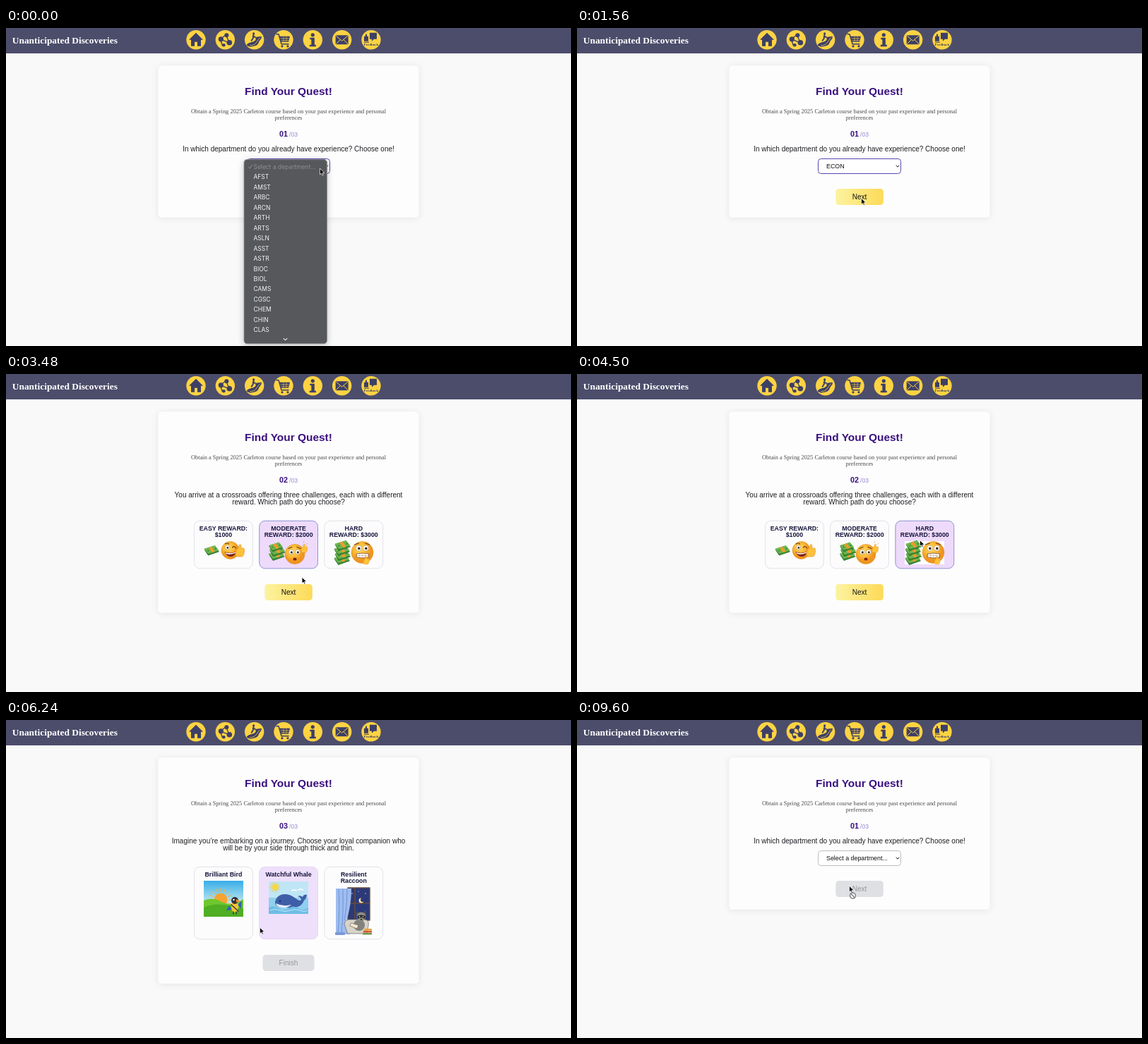
Animation of 800x451 px, one loop 9660 ms. Source, as an HTML page:

```html
<!DOCTYPE html>
<html lang="en">
<head>
<meta charset="utf-8">
<title>Find Your Quest!</title>
<style>
html, body { margin: 0; width: 100%; height: 100%; overflow: hidden; background: #f9f9f9; }
svg { display: block; width: 100%; height: 100%; }
text { font-family: "Liberation Sans", Arial, sans-serif; white-space: pre; }
.serif { font-family: "Liberation Serif", Times, serif; }
.menu { font-family: Inter, sans-serif; }
.b { font-weight: bold; }
</style>
</head>
<body>
<svg id="stage" viewBox="0 0 800 451" xmlns="http://www.w3.org/2000/svg"></svg>
<script>
const LOOP = 9660, ROW = 14.45;
const INK = "#3d3f66", GOLD = "#fdd343", NAVY = "#17173d";
const CODES = "AFST AMST ARBC ARCN ARTH ARTS ASLN ASST ASTR BIOC BIOL CAMS CGSC CHEM CHIN CLAS CS DANC ECON EDUC ENGL FREN".split(" ");
const COLS = [266.5, 358.7, 450.9];

// cursor tip over time: ms, x, y
const PATH = [
  [0, 444.5, 199.5], [250, 444.5, 199.5], [850, 424.5, 375.5], [1200, 424.5, 375.5],
  [1600, 402, 238], [1900, 402, 238], [2350, 419, 243], [2850, 419, 243],
  [3150, 402, 302], [3350, 402, 302], [3800, 485.5, 236], [4550, 485.5, 236],
  [4950, 402, 309], [5500, 402, 309], [6100, 359.5, 294.5], [6280, 359.5, 294.5],
  [6600, 402, 262], [6850, 402, 262], [7250, 393.5, 349.5], [8300, 393.5, 349.5],
  [8950, 345, 229], [9380, 345, 229], [9570, 385.5, 235.5], [LOOP, 385.5, 235.5]
];
const AT = { close: 1200, page2: 1850, pick2: 2800, pick3: 3950, page3: 5350, whale: 6750, result: 7500, again: 9400 };

const text = (x, y, size, fill, str, cls = "", anchor = "middle", more = "") =>
  `<text x="${x}" y="${y}" font-size="${size}" fill="${fill}" class="${cls}" text-anchor="${anchor}" ${more}>${str}</text>`;
const rect = (x, y, w, h, r, fill, more = "") =>
  `<rect x="${x}" y="${y}" width="${w}" height="${h}" rx="${r}" fill="${fill}" ${more}/>`;
const circ = (x, y, r, fill, more = "") => `<circle cx="${x}" cy="${y}" r="${r}" fill="${fill}" ${more}/>`;
const path = (d, fill = "none", stroke = "none", w = 1) =>
  `<path d="${d}" fill="${fill}" stroke="${stroke}" stroke-width="${w}" stroke-linecap="round" stroke-linejoin="round"/>`;
const group = (id, body, more = "") => `<g id="${id}" ${more}>${body}</g>`;
const at = (x, y, body, more = "") => `<g transform="translate(${x} ${y}) ${more}">${body}</g>`;

function icons() {
  const glyphs = [
    path("M-10 0L0-10 10 0H7V9H2V3H-2V9H-7V0Z", INK),
    path("M-7-1L1-7M-7-1L6 4M6 4L1-7M-7-1L-4 8", "none", INK, 1.4) +
      circ(-6, -1, 3.6, INK) + circ(2, -6.5, 3, INK) + circ(6, 4, 3.8, INK) + circ(-2, 7.5, 2.3, INK),
    path("M-11 8C-10 3-2 4 1 1S-1-3 3-4L10-5C11-1 7 0 6 4S0 9-6 10Z", INK) +
      path("M-1-8L-2-2M-2-5L1-4M-2-2L-4 1", "none", INK, 2) + circ(-1, -9, 1.6, INK) +
      path("M-6 8C0 8 2 5 4 2S7-2 8-3", "none", GOLD, .8),
    path("M-6-5H9L7 3H-4Z", INK) + path("M-10-8H-7L-3 6H7", "none", INK, 1.5) +
      circ(-2, 9, 1.6, INK) + circ(6, 9, 1.6, INK) + path("M-4-2H7M-3 1H7M0-4V2M4-4V2", "none", GOLD, .6),
    circ(0, -7, 2.6, INK) + path("M-4-3H2.5V7H4.5V9.5H-4.5V7H-2V-.5H-4Z", INK),
    rect(-9, -6.5, 18, 13, 1, INK) + path("M-8-5.5L0 1.5 8-5.5M-8 5.5L-2.5 0M8 5.5L2.5 0", "none", GOLD, 1),
    path("M-2-10H8V-1H4L1 2V-1H-2Z", INK) + path("M-10-5H-4V2H-10ZM-8-8H-6V-5H-8ZM-10 3H-3V4H-10Z", INK) +
      text(0, 8.3, 5, INK, "Feedback", "serif b")
  ];
  return glyphs.map((g, i) => at(269 + i * 41.33, 16.8, circ(0, 0, 13.7, GOLD) + g)).join("");
}

function bill(x, y, s = 1) {
  return at(x, y,
    path("M-11-2L5-7 11 2-5 8Z", "#3f8f38") + path("M-11-2L5-7 11 0-5 5Z", "#70b64d") +
    path("M-4-4L0-5.3 5 2 1 3.5Z", "#f19a2c") + path("M-10 0L-5 7 11 2", "none", "#2d6f2c", .8) +
    circ(-5, .5, 1.3, "#3f8f38") + circ(6, -2.3, 1.3, "#3f8f38"), `scale(${s})`);
}
const ball = r => circ(0, 0, r, "url(#face)", 'stroke="#d98a1c" stroke-width=".5"');
const eye = (x, y, r) => circ(x, y, r, "#fff", 'stroke="#8a5a20" stroke-width=".4"') + circ(x + .3, y + .4, r * .45, "#3d2c1c");
const thumb = path("M-4 1C-3-1 0-3 1-8C3-9 4-7 3-3H7C9-2 8 7 5 9H-2C-5 8-5 4-4 1Z", "#ffc13a", "#d98a1c", .6);

const easy = bill(291, 250, .95) +
  at(317.5, 250, ball(12.5) + eye(-4, -4, 3.2) + path("M3-4Q6-7 8-3M-7-9Q-4-11-2-9", "none", "#6b3d14", 1.2) +
    path("M-8 2Q1 6 9 1Q6 10 0 9Q-6 8-8 2Z", "#7b2417") + path("M-7 3Q1 6 8 2L7 4Q0 7-6 5Z", "#fff")) +
  at(329.5, 250, thumb);
const moderate = bill(383, 257) + bill(384, 251) + bill(382, 245, .9) +
  at(409, 255.5, ball(14) + eye(-5, -3, 3.5) + eye(4, -3, 3.5) + path("M-9-8L-4-10M3-10L8-8", "none", "#6b3d14", 1.3) +
    `<ellipse cx="0" cy="7" rx="2.6" ry="2" fill="#7b2417"/>`) +
  at(421, 247, thumb, "scale(.7)") + path("M421 239l1-2M425 242l2-2", "none", "#d9a24a", .7);
const hard = rect(464, 237, 56, 33, 0, "#fff") +
  [263, 257, 250, 243].map((y, i) => bill(475.5 + (i % 2), y, 1)).join("") +
  at(504.5, 253, ball(15.5) + eye(-5, -6, 4) + eye(5, -6, 4) + path("M-11-11L-5-13M4-13L10-11", "none", "#6b3d14", 1.2) +
    path("M-8 2Q0 0 9 2V7Q0 9-8 7Z", "#fff", "#7b4a20", .8) + path("M-4 1V8M0 1V8M4 1V8M-8 4.5H9", "none", "#a98258", .4)) +
  at(509, 264, thumb, "scale(.65)");

const rays = (x, y, r, n, c) => Array.from({ length: n }, (_, i) => {
  const a = i * 2 * Math.PI / n, p = k => `${(x + k * Math.cos(a)).toFixed(1)} ${(y + k * Math.sin(a)).toFixed(1)}`;
  return path(`M${p(r * 1.25)}L${p(r * 1.8)}`, "none", c, 1);
}).join("");

const bird = rect(280, 228, 56, 51, 0, "url(#sky)") + rays(304, 255, 9, 16, "#f6b23c") + circ(304, 255, 9.5, "#f7a32f") +
  path("M280 256Q292 250 306 258T336 254V279H280Z", "#6fc72e") + path("M280 266Q300 256 336 268V279H280Z", "#4fae23") +
  path("M316 263L312 270 320 269ZM328 262L334 256 333 268Z", "#2f5fc0") +
  `<ellipse cx="324" cy="265" rx="5" ry="8" fill="#f4c62a"/>` + circ(324, 256, 5, "#30343c") + circ(322.5, 255, 1.2, "#fff") +
  path("M326 254L332 257 326 259Z", "#f08a24") + path("M319 262L329 271M322 272V275M326 272V275", "none", "#3c3150", 1.4);
const whale = rect(372, 229, 56, 46, 0, "#bfe6f6") + rect(372, 252, 56, 23, 0, "#8fd0ee") +
  rays(381, 237, 4, 12, "#f3c936") + circ(381, 237, 4.5, "#f9d643") +
  path("M381 259C382 248 393 245 401 248C410 251 413 257 417 256C419 255 418 252 413 250C416 248 419 250 420 251C421 248 423 247 426 248C426 253 422 255 421 258C417 266 408 267 398 266C387 266 381 264 381 259Z", "#3f5ea8") +
  path("M382 260Q392 265 404 262Q399 267 391 266Q383 265 382 260Z", "#e6eef8") + circ(388, 257, 1, "#10182c") +
  path("M372 266Q379 262 386 267T400 267T414 267T428 266V275H372Z", "#6fbde6") +
  path("M374 270Q381 267 388 270T402 270T416 270T427 270", "none", "#d9f2fc", .8) +
  path("M405 242q3-2 6 0M414 241q3-2 6 0", "none", "#fff", 1.6);
const raccoon = rect(465, 237, 55, 69, 0, "#fff") + rect(484, 238, 31, 46, 0, "#2b3a78") +
  path("M484 238H515V284H484ZM494 238V284M484 260H515", "none", "#6b4b3c", 1.5) +
  circ(503, 256, 3.5, "#f6e6a0") + circ(505, 255, 3, "#2b3a78") + circ(490, 246, .7, "#fff") + circ(509, 246, .7, "#fff") + circ(499, 243, .6, "#fff") +
  path("M467 239H489Q489 264 482 284L487 304H467Z", "#9fbdf0") +
  path("M471 240Q473 270 470 303M477 240Q478 270 475 303M483 240Q483 265 479 284", "none", "#6e93d8", 1) +
  path("M479 289Q480 282 488 283H508Q515 284 513 292L511 303H484Z", "#d7d3cb", "#6b6660", .7) +
  `<ellipse cx="500" cy="291" rx="8" ry="8" fill="#84827f"/>` + path("M495 276L497 271 501 274H505L509 270 510 277Z", "#55524f") +
  circ(503, 279, 6.5, "#8f8d89") + path("M497 278Q503 275 509 278L508 282 503 280 498 282Z", "#2d2b2b") +
  circ(500.5, 279, .8, "#fff") + circ(505.5, 279, .8, "#fff") + circ(503, 283, 1.1, "#222") +
  path("M489 288L499 291 497 296 487 292Z", "#f2e7cf", "#6b5a48", .6) +
  rect(506, 299, 12, 2.5, 0, "#d2542e") + rect(507, 296, 11, 2.5, 0, "#e2a33a") + rect(505, 302, 13, 2.5, 0, "#6f9a4c") +
  rect(466, 301, 14, 4, 1, "#7d98d2");

const button = (id, x, y, w, label, on) => group(id,
  rect(x, y, w, 23, 4.5, on ? "url(#gold)" : "#dfe0e3") +
  text(x + w / 2, y + 15.1, 10.1, on ? "#151515" : "#97979c", label));
const both = (id, x, y, w, label) => button(id + "Off", x, y, w, label, false) + button(id + "On", x, y, w, label, true);

const option = (page, i, h, lines, pic) =>
  rect(COLS[i], 208.3, 82.8, h, 8, "#fcfcfd", `id="opt${page}${i}" stroke="#e2e2ea" stroke-width="1"`) +
  lines.map((s, k) => text(COLS[i] + 41.4, 222 + k * 9.1, 8.8, NAVY, s, "b")).join("") + pic;

const step = n => text(387, 153.6, 10.8, "#3a117f", "0" + n, "b", "start") + text(401, 153.6, 8.6, "#9787d3", "/03", "", "start");
const ask = (...lines) => lines.map((s, i) => text(400, 174.8 + i * 10.3, 10, "#1f1f24", s)).join("");
const intro = size => text(400, 121, size, "#4b4b50", "Obtain a Spring 2025 Carleton course based on your past experience and personal", "serif") +
  text(400, 130, size, "#4b4b50", "preferences", "serif");

const page1 = intro(8.43) + step(1) + ask("In which department do you already have experience? Choose one!") +
  rect(341.5, 185.5, 117, 21, 4, "#fff", 'id="select" stroke-width="1"') +
  text(353, 199.2, 8.9, "#111", "", "", "start", 'id="choice"') + path("M452 195l2 2.2 2-2.2", "none", "#222", 1) +
  both("next1", 366.3, 228, 67.5, "Next");
const page2 = intro(8.43) + step(2) +
  ask("You arrive at a crossroads offering three challenges, each with a different", "reward. Which path do you choose?") +
  option(2, 0, 67.5, ["EASY REWARD:", "$1000"], easy) +
  option(2, 1, 67.5, ["MODERATE", "REWARD: $2000"], moderate) +
  option(2, 2, 67.5, ["HARD", "REWARD: $3000"], hard) + both("next2", 366.3, 298, 67.5, "Next");
const page3 = intro(8.43) + step(3) +
  ask("Imagine you’re embarking on a journey. Choose your loyal companion who", "will be by your side through thick and thin.") +
  option(3, 0, 102.5, ["Brilliant Bird"], bird) + option(3, 1, 102.5, ["Watchful Whale"], whale) +
  option(3, 2, 102.5, ["Resilient", "Raccoon"], raccoon) + both("finish", 363.5, 333, 73, "Finish");
const page4 = intro(8.91) + text(400.4, 159.5, 13.3, "#26262e", "Result", "serif b", "middle", 'letter-spacing=".8"') +
  rect(250, 164, 300, 1.6, 0, "#4a9ad4") +
  text(348.3, 192, 8.9, "#3f3f45", "Your course:", "serif", "start") + text(395.8, 192.2, 11.8, "#5a94de", "MATH 331", "serif", "start") +
  button("redo", 282.3, 219.3, 120.5, "Do Another Quiz", true) + button("graph", 411.5, 219.3, 106.3, "See In Graph", true) +
  circ(402.8, 265, 5.6, GOLD) + path("M400 265H405.6M402.8 262.2V267.8", "none", "#fff", 1.4);

const menu = rect(337, 0, 117.5, 0, 4.5, "#57585b", 'id="panel" stroke="#8d8d90" stroke-width=".8" filter="url(#drop)"') +
  rect(340, 0, 111.6, ROW, 3, "#4a82e8", 'id="mark"') +
  `<g clip-path="url(#list)"><g id="rows">` +
  path("M343.5 0l1.8 2.2 3-5", "none", "#8f8f92", 1) + text(350.5, 3, 8.45, "#8f8f92", "Select a department...", "menu", "start") +
  CODES.map((c, i) => text(350.5, 3 + (i + 1) * ROW, 8.45, "#f4f4f5", c, "menu", "start")).join("") + "</g></g>" +
  path("M393 440.3l2.5 2.4 2.5-2.4", "none", "#eee", 1.1);

const cursor = group("arrow", path("M0 0V8.4L2 6.6 3.4 9.6 4.8 9 3.5 6.1H6.2Z", "#000", "#fff", .7)) +
  group("hand", path("M-1 0C-1-1.5 1-1.5 1 0V3.5L4 4.3Q5 4.7 4.8 6L4 9.5H-1.5L-4 6C-4 4.7-2.5 4.6-1 6Z", "#fff", "#222", .7)) +
  group("ban", circ(5, 13.6, 4, "#f4f4f4", 'stroke="#77777a" stroke-width="1.3"') + path("M2.4 11L7.6 16.2", "none", "#77777a", 1.2));

const stop = (o, c) => `<stop offset="${o}" stop-color="${c}"/>`;
document.getElementById("stage").innerHTML = `<defs>
  <linearGradient id="gold">${stop(0, "#fcf3a0")}${stop(1, "#fdda58")}</linearGradient>
  <linearGradient id="sky" x2="0" y2="1">${stop(0, "#36aee8")}${stop(.6, "#bfe5ee")}</linearGradient>
  <radialGradient id="face" cx=".4" cy=".35">${stop(0, "#ffdf6a")}${stop(.6, "#fcb934")}${stop(1, "#ef9420")}</radialGradient>
  <filter id="soft" x="-10%" y="-15%" width="120%" height="130%"><feDropShadow dx="0" dy="1" stdDeviation="5" flood-opacity=".09"/></filter>
  <filter id="drop" x="-20%" y="-10%" width="140%" height="120%"><feDropShadow dx="0" dy="2" stdDeviation="4" flood-opacity=".25"/></filter>
  <clipPath id="list"><rect x="337" y="90" width="118" height="345"/></clipPath></defs>` +
  rect(0, 0, 800, 451, 0, "#f9f9f9") + rect(0, 0, 800, 36, 0, "#4c4d6b") +
  text(8.8, 22.2, 13.4, "#fff", "Unanticipated Discoveries", "serif b", "start") + icons() +
  rect(215.7, 53.7, 368.6, 215, 4.5, "#fdfdfd", 'id="card" filter="url(#soft)"') +
  text(400, 95, 15.45, "#3a117f", "Find Your Quest!", "b") +
  [page1, page2, page3, page4].map((p, i) => group("page" + (i + 1), p)).join("") +
  group("menu", menu) + group("cursor", cursor);

const $ = {};
document.querySelectorAll("#stage [id]").forEach(e => $[e.id] = e);
const show = (id, on) => $[id].style.display = on ? "" : "none";
const set = (id, attrs) => { for (const k in attrs) $[id].setAttribute(k, attrs[k]); };
const ease = p => { p = Math.min(1, Math.max(0, p)); return p * p * (3 - 2 * p); };

function pointer(t) {
  const i = Math.max(1, PATH.findIndex(k => k[0] > t));
  const [t0, x0, y0] = PATH[i - 1], [t1, x1, y1] = PATH[i], p = ease((t - t0) / (t1 - t0));
  return [x0 + (x1 - x0) * p, y0 + (y1 - y0) * p];
}

function options(page, h, picked, x, y) {
  COLS.forEach((c, i) => {
    const over = x >= c && x <= c + 83 && y >= 208 && y <= 208 + h, on = i === picked;
    set("opt" + page + i, { fill: on ? "#eedafb" : over ? "#eedffb" : "#fcfcfd", stroke: on ? "#8d93d2" : over ? "#e6d8f2" : "#e2e2ea" });
  });
}

function draw(t) {
  const [x, y] = pointer(t);
  const page = t < AT.page2 || t >= AT.again ? 1 : t < AT.page3 ? 2 : t < AT.result ? 3 : 4;
  for (let i = 1; i <= 4; i++) show("page" + i, i === page);
  set("card", { height: [215, 284.8, 320, 235][page - 1] });

  const open = t < AT.close, chosen = !open && t < AT.page2;
  $.choice.textContent = chosen ? "ECON" : "Select a department...";
  set("select", { stroke: t < AT.page2 ? "#5a46ae" : "#bdbdc2" });
  const enable = (id, on) => { show(id + "On", on); show(id + "Off", !on); };
  enable("next1", chosen);
  enable("next2", t >= AT.pick2);
  enable("finish", t >= AT.whale);
  options(2, 68, t < AT.pick2 ? -1 : t < AT.pick3 ? 1 : 2, x, y);
  options(3, 103, t < AT.whale ? -1 : 1, x, y);

  show("menu", open);
  if (open) {
    const base = 197 - 86.7 * ease((t - 400) / 450), row = Math.round((y + 4 - base) / ROW);
    set("panel", { y: base - 10.5, height: 458.2 - base });
    set("rows", { transform: `translate(0 ${base})` });
    show("mark", row > 0);
    set("mark", { y: base + row * ROW - ROW / 2 });
  }

  const hand = t >= AT.page2 && t < 2950;
  show("hand", hand);
  show("arrow", !hand);
  show("ban", t >= AT.again && y > 228 && x > 366);
  set("cursor", { transform: `translate(${x} ${y})` });
}

const start = performance.now();
function tick() {
  draw((performance.now() - start) % LOOP);
  requestAnimationFrame(tick);
}
tick();
</script>
</body>
</html>
```
